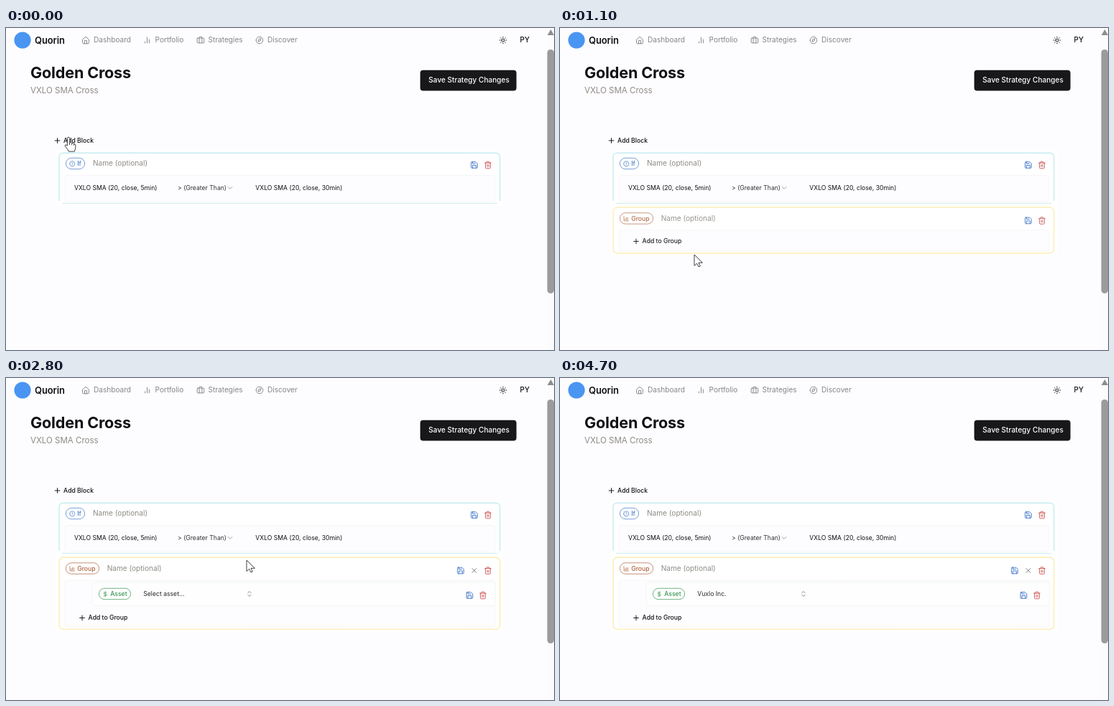
Recreate the animation shown at these times as an HTML page with a canvas. Size 763 by 449 pixels, loop 4800 ms.

```html
<!DOCTYPE html>
<html lang="en">
<head>
<meta charset="utf-8">
<title>Strategy builder</title>
<style>
  html, body { margin: 0; width: 100%; height: 100%; overflow: hidden; background: #fdfcfe; }
  canvas { display: block; width: 763px; height: 449px; }
</style>
</head>
<body>
<canvas id="stage"></canvas>
<script>
const W = 763, H = 449, LOOP = 4800, STEP = 100;
const canvas = document.getElementById('stage');
const ctx = canvas.getContext('2d');
const dpr = window.devicePixelRatio || 1;
canvas.width = W * dpr;
canvas.height = H * dpr;

const SMALL = 8.64, BASE = 10.08, LARGE = 11.52;
const BLACK = '#111113', GRAY = '#868589', MUTED = '#8f8b85', NOTE = '#9b9a9e';
const BLUE = '#4379c8', RED = '#cb5856', ORANGE = '#ad6541', GREEN = '#3a9453';

// Icons live on a 24 x 24 grid.
const circle = (x, y, r) => `M${x - r} ${y}a${r} ${r} 0 1 0 ${2 * r} 0a${r} ${r} 0 1 0 ${-2 * r} 0`;
const ICONS = {
  home: 'M3 10l9-8 9 8v10a2 2 0 0 1-2 2H5a2 2 0 0 1-2-2zM9 22v-9h6v9',
  bars: 'M6 20v-4M12 20V4M18 20V10',
  briefcase: 'M4 6h16a2 2 0 0 1 2 2v10a2 2 0 0 1-2 2H4a2 2 0 0 1-2-2V8a2 2 0 0 1 2-2zM8 20V4a2 2 0 0 1 2-2h4a2 2 0 0 1 2 2v16',
  compass: circle(12, 12, 10) + 'M16.2 7.8l-2.1 6.3-6.3 2.1 2.1-6.3z',
  sun: circle(12, 12, 4) + 'M12 2v2M12 20v2M2 12h2M20 12h2M5 5l1.4 1.4M17.6 17.6L19 19M5 19l1.4-1.4M17.6 6.4L19 5',
  plus: 'M5 12h14M12 5v14',
  alert: circle(12, 12, 10) + 'M12 7v6M12 16.5v.2',
  dollar: 'M12 2v20M17 5.5H9.5a3.2 3.2 0 0 0 0 6.5h5a3.2 3.2 0 0 1 0 6.5H6',
  chart: 'M3 3v16a2 2 0 0 0 2 2h16M8 17v-5M13 17V8M18 17v-9',
  percent: 'M19 5L5 19' + circle(6.5, 6.5, 2.5) + circle(17.5, 17.5, 2.5),
  filter: 'M3 6h18M7 12h10M10 18h4',
  action: 'M5 3h14a2 2 0 0 1 2 2v14a2 2 0 0 1-2 2H5a2 2 0 0 1-2-2V5a2 2 0 0 1 2-2zM7 8l3 3-3 3M12 15h4',
  save: 'M5 3h11l5 5v11a2 2 0 0 1-2 2H5a2 2 0 0 1-2-2V5a2 2 0 0 1 2-2zM7 3v5h8M7 21v-8h10v8',
  trash: 'M3 6h18M19 6v14a2 2 0 0 1-2 2H7a2 2 0 0 1-2-2V6M8 6V4a2 2 0 0 1 2-2h4a2 2 0 0 1 2 2v2M10 11v6M14 11v6',
  close: 'M18 6L6 18M6 6l12 12',
  updown: 'M7 15l5 5 5-5M7 9l5-5 5 5',
  down: 'M4 8l8 8 8-8',
  search: circle(11, 11, 8) + 'M21 21l-4.3-4.3'
};
for (const k in ICONS) ICONS[k] = new Path2D(ICONS[k]);

const HAND = new Path2D('M-2.6 11.5V1.8Q-2.6 .2 -1 .2T.6 1.8V7.3Q2.9 6.7 3.7 8.5Q5.9 7.7 6.5 9.5Q8.8 9.3 8.8 11.6V14.2Q8.8 17 7.3 20.2H-.6Q-1.6 17.6-5.2 13.4Q-6.4 11.8-5.3 11Q-4.1 10.3-2.6 12.2Z');
const HAND_LINES = new Path2D('M.6 7.3V11M3.7 8.5V11.3M6.5 9.5V11.7');
const ARROW = new Path2D('M0 0V15.5L3.6 12.2L6 17L8.3 16L6 11.3H11.3Z');

const MENU = [
  ['alert', 'Condition (If/Then)', 'Execute blocks based on a condition'],
  ['dollar', 'Asset / Instrument', 'Add stocks, ETFs, crypto, etc.'],
  ['chart', 'Portfolio Group', 'Group multiple assets/blocks'],
  ['percent', 'Weight / Exposure', 'Allocate funds to the block(s) below'],
  ['filter', 'Metric Filter', 'Filter assets based on metrics'],
  ['action', 'Action', 'Define a specific action (Buy, Sell, Notify)']
];
const TICKER = 'VXLO', ASSET = 'Vuxlo Inc.';
const ASSETS = [ASSET, 'Brenqua Corp.', 'Dovrik Ltd.', 'Halmund Co.', 'Kestovar Inc.', 'Ormiquel Corp.', 'Tavrono Inc.'];

// Pointer path: time, x, y, shape
const PATH = [
  [0, 88, 152, HAND], [300, 88, 152, HAND], [600, 187, 316, HAND],
  [900, 187, 316, ARROW], [1300, 187, 316, ARROW], [1600, 136, 292, HAND],
  [1800, 136, 292, HAND], [2100, 229, 99, HAND], [2200, 229, 99, HAND],
  [2300, 240, 115, ARROW], [2500, 335, 254, ARROW], [2900, 335, 254, ARROW],
  [3200, 311, 302, HAND], [3300, 311, 302, HAND], [3500, 262, 88, HAND],
  [3600, 262, 88, HAND], [3800, 311, 302, HAND], [3900, 311, 302, HAND],
  [4100, 335, 188, ARROW], [4200, 335, 188, ARROW], [4600, 110, 78, ARROW]
];
const POINTER_END = 4700;

const clamp = v => Math.max(0, Math.min(1, v));
const ease = v => v * v * (3 - 2 * v);
const fade = (t, from, to) => Math.min(clamp((t - from + 100) / 200), clamp((to - t) / 200));

// y is the middle of the capital letters
function text(s, x, y, size, color, weight = 400, spacing = 0) {
  ctx.font = `${weight} ${size}px Inter, sans-serif`;
  ctx.letterSpacing = spacing + 'px';
  ctx.fillStyle = color;
  ctx.fillText(s, x, y + size * 0.364);
}

function icon(name, x, y, color, size = LARGE, width = 2) {
  ctx.save();
  ctx.translate(x - size / 2, y - size / 2);
  ctx.scale(size / 24, size / 24);
  ctx.lineWidth = width;
  ctx.lineCap = ctx.lineJoin = 'round';
  ctx.strokeStyle = color;
  ctx.stroke(ICONS[name]);
  ctx.restore();
}

function box(x, y, w, h, r, fill, stroke, width = 1) {
  ctx.beginPath();
  ctx.roundRect(x, y, w, h, r);
  if (fill) { ctx.fillStyle = fill; ctx.fill(); }
  if (stroke) { ctx.strokeStyle = stroke; ctx.lineWidth = width; ctx.stroke(); }
}

function line(x1, y1, x2, y2, color) {
  ctx.beginPath();
  ctx.moveTo(x1, y1);
  ctx.lineTo(x2, y2);
  ctx.strokeStyle = color;
  ctx.lineWidth = 1;
  ctx.stroke();
}

function badge(x, y, w, name, label, color) {
  box(x + 0.4, y - 7.7, w - 0.8, 15.4, 7.7, '#fff', color, 0.72);
  icon(name, x + 9.2, y + 0.3, color, 8.6);
  text(label, x + 16.2, y, SMALL, color, 500);
}

function addButton(label, x, y) {
  icon('plus', x, y, BLACK);
  text(label, x + 8.6, y - 0.2, SMALL, BLACK, 500);
}

function drawPage() {
  ctx.fillStyle = '#fdfcfe';
  ctx.fillRect(0, 0, W, H);

  ctx.beginPath();
  ctx.arc(23, 17, 11.6, 0, 7);
  ctx.fillStyle = '#4a95f2';
  ctx.fill();
  text('Quorin', 40, 17.6, 12.96, BLACK, 600, -0.1);
  const nav = [['home', 111, 'Dashboard', 122], ['bars', 196.5, 'Portfolio', 207.5],
    ['briefcase', 271, 'Strategies', 281.5], ['compass', 353, 'Discover', 364]];
  for (const [name, x, label, tx] of nav) {
    icon(name, x, 17, GRAY);
    text(label, tx, 16.8, BASE, GRAY);
  }
  icon('sun', 692, 17, BLACK);
  text('PY', 715.5, 16.8, BASE, BLACK, 500);

  text('Golden Cross', 34, 62.4, 21.6, BLACK, 700, -0.17);
  text(TICKER + ' SMA Cross', 34, 86.8, LARGE, MUTED);
  box(576.7, 58.7, 134, 28.8, 4, '#18181a');
  text('Save Strategy Changes', 588.3, 72.6, BASE, '#fff', 500);
  addButton('Add Block', 71.5, 157);

  ctx.fillStyle = '#fcfbfd';
  ctx.fillRect(753.5, 0, 9.5, H);
  box(753.6, 30, 9.4, 340, 4.5, '#9b9b9b');
  ctx.beginPath();
  ctx.moveTo(753.8, 10);
  ctx.lineTo(758.5, 2);
  ctx.lineTo(763, 10);
  ctx.fillStyle = '#8d8d8d';
  ctx.fill();
}

function drawCondition() {
  ctx.fillStyle = '#fff';
  ctx.fillRect(69, 171, 623, 77);
  ctx.beginPath();
  ctx.moveTo(74, 241);
  ctx.lineTo(74, 180);
  ctx.quadraticCurveTo(74, 174.2, 80, 174.2);
  ctx.lineTo(681.7, 174.2);
  ctx.quadraticCurveTo(687.7, 174.2, 687.7, 180);
  ctx.lineTo(687.7, 241);
  ctx.strokeStyle = '#c6ebf0';
  ctx.lineWidth = 1.4;
  ctx.stroke();
  box(82, 205.5, 599, 37, 3, '#fdfcfe', '#f6f4f7', 0.8);
  line(78, 244.5, 684, 244.5, '#cfecf0');
  badge(83, 189, 27, 'alert', 'If', BLUE);
  text('Name (optional)', 121, 188.6, BASE, MUTED);
  icon('save', 652, 191, BLUE);
  icon('trash', 671, 191, RED);
  text(TICKER + ' SMA (20, close, 5min)', 95, 222.8, SMALL, BLACK);
  text('> (Greater Than)', 239, 222.8, SMALL, '#303033');
  icon('down', 312, 223, '#85795f', 8.6);
  text(TICKER + ' SMA (20, close, 30min)', 347.3, 222.8, SMALL, BLACK);
}

function drawGroup(t, hover) {
  const open = t >= 2800;
  const bottom = open ? 350.4 : 314;
  ctx.save();
  ctx.globalAlpha = t < 1200 ? 0.92 : 1;
  ctx.fillStyle = '#fff';
  ctx.fillRect(69, 248, 623, bottom - 245);
  box(74, 250, 613.7, bottom - 250, 6, '#fff', '#fbedb0', 1.4);
  box(82, 282, 599, bottom - 285, 3, '#fdfcfe', '#f6f4f7', 0.8);
  badge(83, 265.5, 47, 'chart', 'Group', ORANGE);
  text('Name (optional)', 140.7, 265.3, BASE, MUTED);
  icon('save', open ? 633 : 652, 268.5, BLUE);
  icon('trash', 671, 268.5, RED);
  if (open) {
    icon('close', 652, 268.5, '#77767a');
    drawAsset(t, hover);
  }
  addButton('Add to Group', 106, open ? 334.5 : 297.5);
  ctx.restore();
}

function drawAsset(t, hover) {
  const chosen = t >= 3600;
  box(120.3, 284.8, 561, 33, 4, '#fefeff', hover ? '#d8f6e1' : '#eefaf2');
  badge(129, 301, 45, 'dollar', 'Asset', GREEN);
  text(chosen ? ASSET : 'Select asset...', 191.3, 300.8, SMALL, '#252528');
  icon('updown', 339, 301, '#77767a', 10.5);
  icon('save', 645.5, 303, BLUE);
  icon('trash', 664, 303, RED);
  if (t >= 3700 && t < 4100) {
    ctx.beginPath();
    for (const [x, d] of [[177.8, 1], [359.5, -1]]) {
      ctx.moveTo(x + 2.2 * d, 289.7);
      ctx.quadraticCurveTo(x, 289.7, x, 294);
      ctx.lineTo(x, 308.5);
      ctx.quadraticCurveTo(x, 312.7, x + 2.2 * d, 312.7);
    }
    ctx.strokeStyle = BLACK;
    ctx.lineWidth = 1.5;
    ctx.stroke();
  }
}

// Fades and grows a floating panel around the point it opens from
function panel(alpha, x, y, draw) {
  if (alpha <= 0) return;
  const s = 0.95 + 0.05 * alpha;
  ctx.save();
  ctx.globalAlpha = alpha;
  ctx.translate(x, y);
  ctx.scale(s, s);
  ctx.translate(-x, -y);
  draw();
  ctx.restore();
}

function drawMenu(x, y) {
  box(x, y, 225.5, 298, 4, '#fefdff');
  text('Add Block', x + 11.6, y + 18.9, LARGE, '#333336');
  text('Select a block type to add', x + 11.6, y + 33.9, BASE, NOTE);
  MENU.forEach(([name, title, note], i) => {
    const ty = y + 65.5 + i * 39.5;
    icon(name, x + 26.8, ty + 5.4, '#a3a2a6', LARGE, 1.7);
    text(title, x + 45.6, ty, BASE, '#333336');
    text(note, x + 45.6, ty + 12.6, SMALL, NOTE);
  });
}

function drawAssetList() {
  box(179, 53.5, 182, 233, 4, '#fefdff', '#ebe9ed');
  icon('search', 191, 67, GRAY, 10);
  text('Search assets...', 202, 67, SMALL, MUTED);
  line(179, 80, 361, 80, '#ebe9ed');
  box(183, 84, 174, 24, 3, '#f4f3f5');
  ASSETS.forEach((name, i) => text(name, 191.3, 96 + i * 28, SMALL, '#252528'));
}

function pointerAt(t) {
  if (t >= POINTER_END) return null;
  let i = PATH.length - 1;
  while (PATH[i][0] > t) i--;
  const a = PATH[i], b = PATH[i + 1] || a;
  const k = a === b ? 0 : ease((t - a[0]) / (b[0] - a[0]));
  return { x: a[1] + (b[1] - a[1]) * k, y: a[2] + (b[2] - a[2]) * k, shape: a[3] };
}

function drawPointer({ x, y, shape }) {
  ctx.save();
  ctx.translate(x, y);
  ctx.lineJoin = 'round';
  ctx.fillStyle = '#fff';
  ctx.strokeStyle = '#2c2c2f';
  ctx.lineWidth = 0.9;
  ctx.fill(shape);
  ctx.stroke(shape);
  if (shape === HAND) ctx.stroke(HAND_LINES);
  ctx.restore();
}

function draw(t) {
  const pointer = pointerAt(t);
  const hover = pointer && pointer.y > 284 && pointer.y < 318;
  ctx.setTransform(dpr, 0, 0, dpr, 0, 0);
  drawPage();
  drawCondition();
  if (t >= 1100) drawGroup(t, hover);
  panel(fade(t, 200, 900), 71, 168, () => drawMenu(58, 170));
  panel(fade(t, 1700, 2400), 106, 284, () => drawMenu(92, -15.8));
  panel(fade(t, 3200, 3700), 270, 287, drawAssetList);
  if (pointer) drawPointer(pointer);
}

function tick(now) {
  draw(Math.floor((now % LOOP) / STEP) * STEP);
  requestAnimationFrame(tick);
}
draw(0);
requestAnimationFrame(tick);
</script>
</body>
</html>
```
